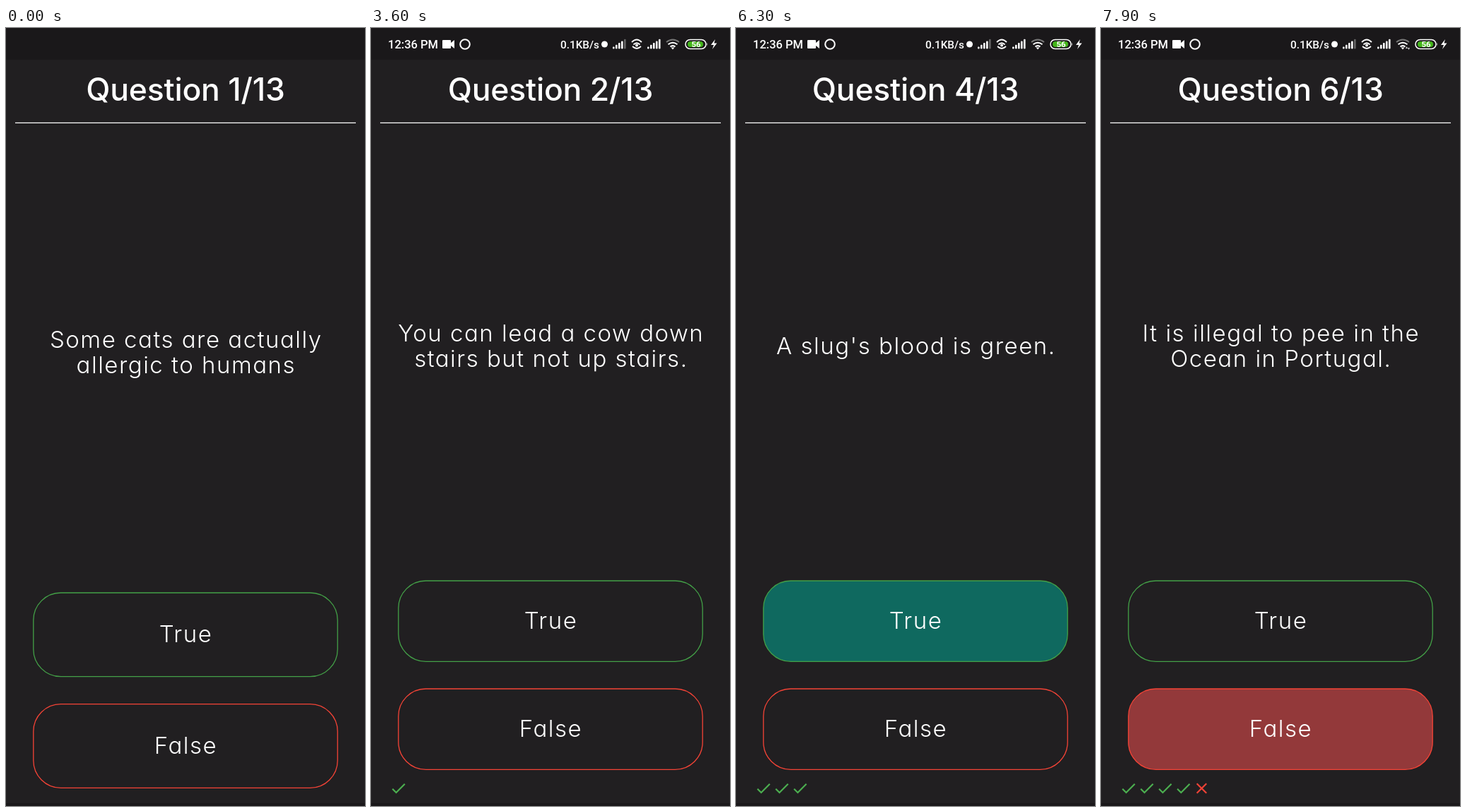
These frames come from a looping animation (508x1102 px, 8000 ms). An HTML page:

```html
<!DOCTYPE html>
<html lang="en">
<head>
<meta charset="utf-8">
<title>True or false quiz</title>
<style>
  html, body { margin: 0; width: 100%; height: 100%; overflow: hidden; background: #211f21; }
  svg { display: block; width: 100vw; height: 100vh; }
  text { fill: #fff; text-anchor: middle; }
  .body { font: 300 33px Inter, "Open Sans", sans-serif; font-feature-settings: "cv11"; letter-spacing: 1.5px; }
  .title { font: 500 44.5px Inter, "Open Sans", sans-serif; font-feature-settings: "cv11"; letter-spacing: -.2px; }
  .bar text { font: 500 16.5px Roboto, sans-serif; text-anchor: start; }
  .line { fill: none; stroke: #fff; }
</style>
</head>
<body>
<svg id="stage" viewBox="0 0 508 1102">
  <rect width="508" height="1102" fill="#211f21"/>
  <path d="M0 0H508V45H0zM0 1098H508V1102H0z" fill="#1a181a"/>
  <g id="status" class="bar" fill="#fff">
    <text x="24" y="29">12:36 PM</text>
    <path d="M102 17h10q1 0 1 1v3l5-4v12l-5-4v3q0 1-1 1h-10q-1 0-1-1v-10q0-1 1-1z"/>
    <circle class="line" cx="133" cy="23" r="6.8" stroke-width="2"/>
    <text id="speed" x="268" y="28.5" style="font-size:15.3px"></text>
    <circle cx="330.5" cy="23" r="4.5"/>
    <g id="bars"></g>
    <g class="line" stroke-width="1.8">
      <path d="M369 20q7-7 14 0M371.5 23.5q4.5-4.5 9 0M370 26q6 6 12 0"/>
    </g>
    <circle cx="376" cy="24.5" r="2"/>
    <g class="line" stroke-width="2">
      <path d="M418 20q9-7 18 0" stroke="#777"/>
      <path d="M420.5 23.3q6.500-5 13 0M423.5 26.5q3.500-2.800 7 0"/>
    </g>
    <path d="M424.5 27.5h5l-2.500 3z"/>
    <path id="arrows" d="M431 29l1.500-3 1.500 3zM434 28h3l-1.500 3z"/>
    <rect class="line" x="445" y="16.5" width="29" height="13" rx="6.5" stroke-width="1.5"/>
    <rect x="448" y="19" width="22" height="8" rx="4" fill="#43b51a"/>
    <path d="M475.5 20.5q1.500 2.500 0 5z"/>
    <text x="453.5" y="27" style="font-size:11.5px;font-weight:700">56</text>
    <path d="M487 16l-6 8h4l-2 6 6.500-8.500h-4z"/>
  </g>
  <text id="title" class="title" x="254" y="103"></text>
  <path class="line" d="M13 134.3H495" stroke-width="1.3"/>
  <g id="question" class="body"></g>
  <g id="buttons" class="body"></g>
  <g id="marks"></g>
</svg>
<script>
const LOOP = 8000, STEP = 100;
const GREEN = "#43a047", RED = "#f44336";
const questions = [
  ["Some cats are actually", "allergic to humans"],
  ["You can lead a cow down", "stairs but not up stairs."],
  ["Approximately one", "quarter of human bones", "are in the feet."],
  ["A slug's blood is green."],
  ["Finn Toldar's mother's", "maiden name was \"Reed\"."],
  ["It is illegal to pee in the", "Ocean in Portugal."]
];
const taps = [
  { at: 3068, yes: true, right: true },
  { at: 5068, yes: false, right: true, x: 178 },
  { at: 5610, yes: true, right: true },
  { at: 6168, yes: true, right: true },
  { at: 6772, yes: false, right: false },
  { at: 7810, yes: false, right: true }
];
const $ = id => document.getElementById(id);
const clamp = v => Math.max(0, Math.min(1, v));

// Highlight strength by time since the press: quick rise, hold, fade.
function glow(age) {
  if (age < 0) return 0;
  return 0.54 * Math.min(clamp(age / 90), clamp((510 - age) / 310));
}

function button(label, y, h, stroke, fill, pressed) {
  const mid = y + h / 2;
  let alpha = 0, dot = "";
  for (const { age, x } of pressed) {
    alpha = Math.max(alpha, glow(age));
    if (x && age > 0 && age < 90)
      dot = `<circle cx="${x}" cy="${mid - 1}" r="${age * 0.35}" opacity=".15"/>`;
  }
  return `<rect x="38.8" y="${y}" width="430.4" height="${h}" rx="38.8" fill="${fill}"
    fill-opacity="${alpha}" stroke="${stroke}" stroke-width="1.3"/>${dot}
    <text x="254.5" y="${mid + 11}">${label}</text>`;
}

function signal(x, lit) {
  return [0, 1, 2, 3, 4].map(i => {
    const h = 3 + i * 2.7;
    return `<rect x="${x + i * 4}" y="${29.5 - h}" width="2.6" height="${h}" rx="1"
      fill="${i < lit ? "#fff" : "#666"}"/>`;
  }).join("");
}

// Icons on a 24-unit grid.
function mark(right, i) {
  const shape = right
    ? `fill="#4caf50" d="M9 16.17L4.83 12l-1.42 1.41L9 19 21 7l-1.41-1.41z"`
    : `fill="${RED}" d="M19 6.41L17.59 5 12 10.59 6.41 5 5 6.41 10.59 12 5 17.59 6.41 19
        12 13.41 17.59 19 19 17.59 13.41 12z"`;
  return `<path transform="translate(${(i + 1) * 25.9} 1064) scale(1.079)" ${shape}/>`;
}

function draw(t) {
  const done = taps.filter(tap => t >= tap.at + 230);
  const n = done.length, lines = questions[n];
  const center = n ? 450 : 459;
  const pressed = yes => taps.filter(tap => tap.yes === yes)
    .map(tap => ({ age: t - tap.at, x: tap.x }));

  $("status").setAttribute("opacity", clamp((t - 300) / 700));
  $("speed").textContent = t < 2300 ? "0.0KB/s" : "0.1KB/s";
  $("arrows").setAttribute("opacity", t < 2900 || t >= 6400 ? 0.8 : 0);
  $("bars").innerHTML = signal(342, t < 3300 ? 3 : 4) + signal(391, 5);
  $("title").textContent = `Question ${n + 1}/13`;
  $("question").innerHTML = lines.map((line, i) =>
    `<text x="254.8" y="${center + 12 + (i - (lines.length - 1) / 2) * 36.4}">${line}</text>`).join("");

  const [top, low, h] = n ? [783, 936, 114.3] : [800, 957.7, 118.7];
  $("buttons").innerHTML =
    button("True", top, h, GREEN, "rgb(1,168,148)", pressed(true)) +
    button("False", low, h, RED, "#f45150", pressed(false));
  $("marks").innerHTML = done.map((tap, i) => mark(tap.right, i)).join("");
}

const start = performance.now();
function tick() {
  const t = (performance.now() - start) % LOOP;
  draw(Math.floor(t / STEP) * STEP);
  requestAnimationFrame(tick);
}
tick();
</script>
</body>
</html>
```
